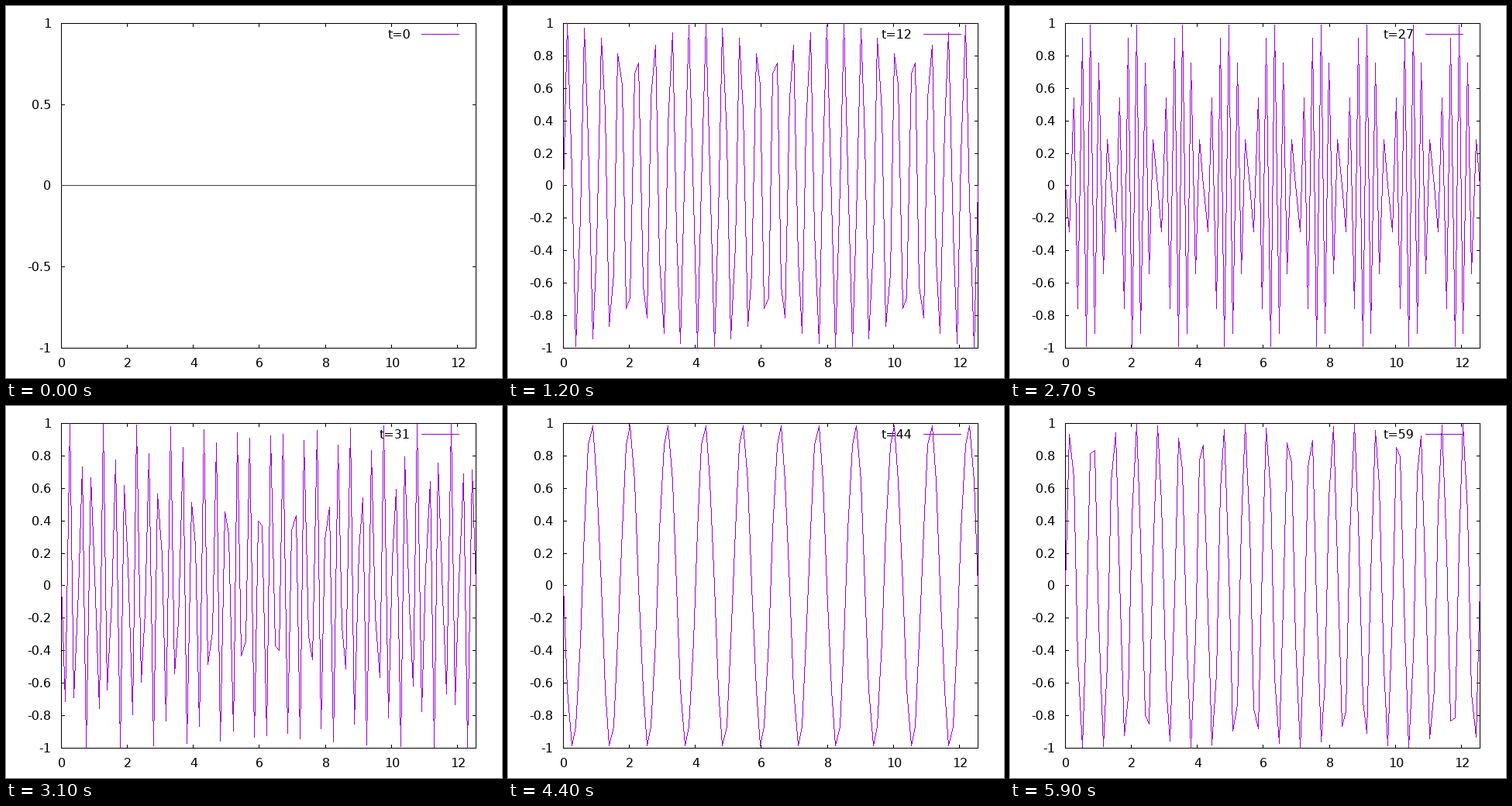
Animation, 640 px wide and 480 px high, one loop 6000 ms. Source, as a matplotlib script:

```python
import numpy as np
import matplotlib.pyplot as plt
from matplotlib.animation import FuncAnimation
from matplotlib.colors import to_rgb

W, H, DPI = 640, 480, 100
PX = 72 / DPI                      # one pixel in points
LEFT, RIGHT, TOP, BOTTOM = 71, 606, 22, 441
X_MAX = 4 * np.pi
FONT = 16
TICK = 4.5
PURPLE, FLAT = "#9400d3", "#404040"
ADVANCE = {"t": 0.392, "=": 0.838, "-": 0.361, ".": 0.318}

plt.rcParams["font.family"] = "DejaVu Sans"
plt.rcParams["text.hinting"] = "default"

fig = plt.figure(figsize=(W / DPI, H / DPI), dpi=DPI, facecolor="white")
ax = fig.add_axes([0, 0, 1, 1])
ax.set_xlim(-0.5, W - 0.5)         # integers are pixel centres
ax.set_ylim(H - 0.5, -0.5)
ax.axis("off")


def px(x):
    return np.floor(LEFT + np.asarray(x) / X_MAX * (RIGHT - LEFT) + 0.5)


def py(y):
    up = np.floor((np.asarray(y) + 1) / 2 * (BOTTOM - TOP) + 0.5)
    return BOTTOM - up


def width(s):
    return FONT * sum(ADVANCE.get(c, 0.636) for c in s)


def stroke(xs, ys, color="black", z=3):
    line, = ax.plot(xs, ys, color=color, lw=PX, antialiased=False,
                    snap=False, solid_capstyle="butt", zorder=z)
    return line


def label(x, y, s):
    return ax.text(x - 0.5, y + 5.5, s, fontsize=FONT * PX,
                   ha="left", va="baseline", zorder=4)


def y_axis(values):
    parts = []
    for v in values:
        y, s = py(v), f"{v:g}"
        parts.append(label(58 - width(s), y, s))
        if abs(v) < 1:
            parts.append(stroke([LEFT, LEFT + TICK], [y, y]))
            parts.append(stroke([RIGHT - TICK, RIGHT], [y, y]))
    return parts


def walk(major, minor):
    """One step per pixel along the longer side of a segment."""
    (a0, b0), (a1, b1) = sorted(zip(major, minor))
    i = np.arange(a1 - a0 + 1)
    step = np.floor(i * abs(b1 - b0) / max(a1 - a0, 1) + 0.5)
    return (a0 + i).astype(int), (b0 + np.sign(b1 - b0) * step).astype(int)


def raster(xs, ys, color):
    """Hard-edged polyline, one pixel wide, on a clear canvas."""
    canvas = np.zeros((H, W, 4))
    for k in range(len(xs) - 1):
        x, y = xs[k:k + 2], ys[k:k + 2]
        if abs(y[1] - y[0]) > abs(x[1] - x[0]):
            rows, cols = walk(y, x)
        else:
            cols, rows = walk(x, y)
        canvas[rows, cols] = (*to_rgb(color), 1)
    return canvas


# border and x axis
stroke([LEFT - 0.5, RIGHT, RIGHT, LEFT, LEFT],
       [TOP, TOP, BOTTOM, BOTTOM, TOP - 0.5])
for v in range(0, 13, 2):
    x, s = px(v), str(v)
    label(x + 1 - width(s) / 2, 460, s)
    if v:
        stroke([x, x], [TOP, TOP + TICK])
        stroke([x, x], [BOTTOM - TICK, BOTTOM])

coarse = y_axis(np.arange(-2, 3) / 2)
fine = y_axis(np.arange(-5, 6) / 5)

# key and curve
stroke([535.5, 584.5], [36, 36], PURPLE, 2)
key = label(492, 36, "")
samples = np.linspace(0, X_MAX, 100)
curve = fig.figimage(np.zeros((H, W, 4)), origin="upper")


def draw(t):
    ys = py(np.sin(t * samples))
    curve.set_data(raster(px(samples), ys, PURPLE if t else FLAT))
    s = f"t={t}"
    key.set_text(s)
    key.set_x(522 - width(s) - 0.5)
    for part in coarse:
        part.set_visible(t == 0)
    for part in fine:
        part.set_visible(t > 0)
    return [curve, key, *coarse, *fine]


anim = FuncAnimation(fig, draw, frames=60, interval=100, repeat=True,
                     repeat_delay=0, blit=False)
plt.show()
```
